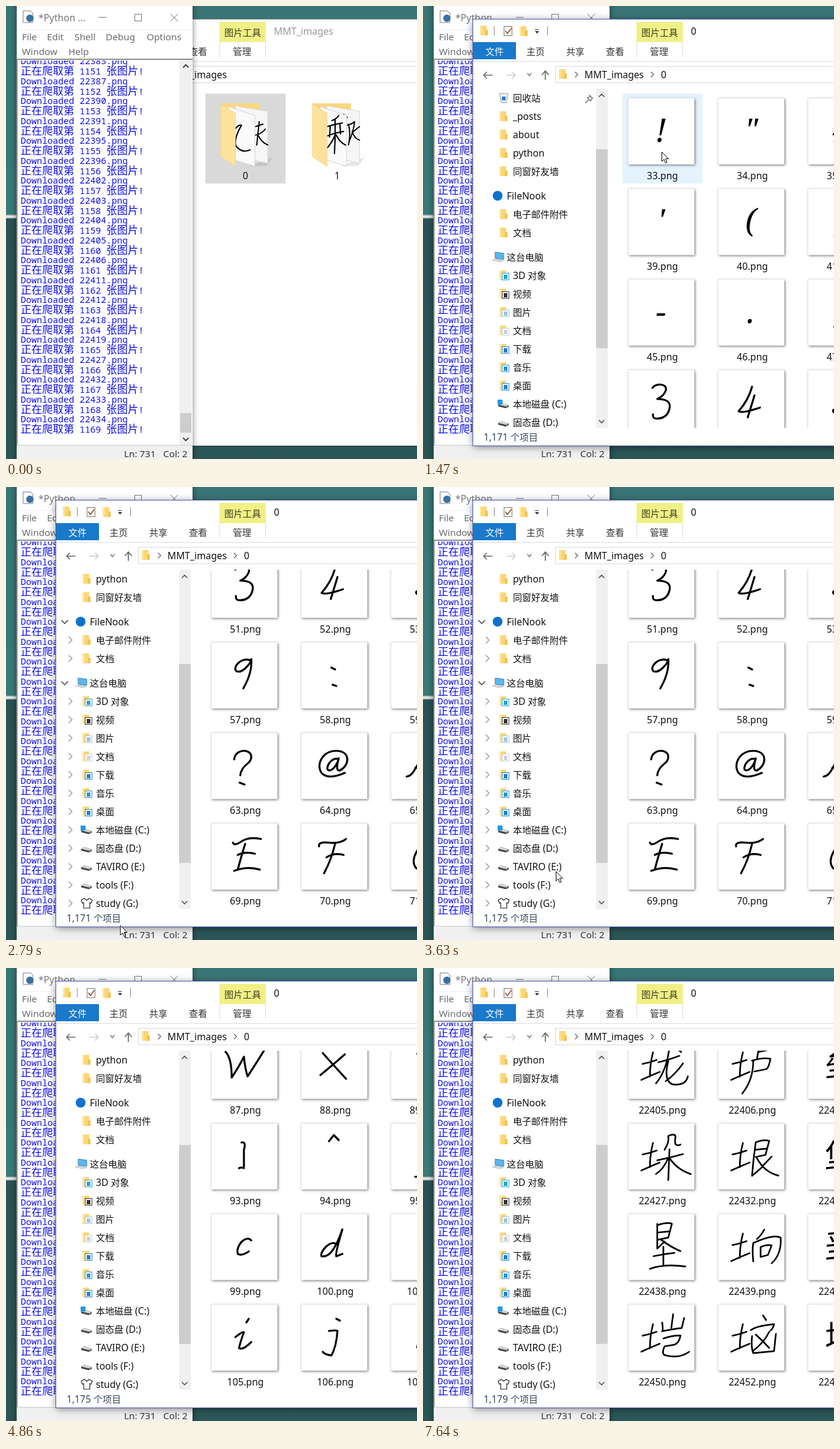
Recreate the animation shown at these times as an HTML page with a canvas. Size 672 by 740 pixels, loop 8000 ms.

```html
<!DOCTYPE html>
<html lang="zh">
<head>
<meta charset="utf-8">
<style>
html, body { margin: 0; width: 672px; height: 740px; overflow: hidden; background: #2a5456; }
canvas { display: block; }
</style>
</head>
<body>
<canvas id="stage" width="672" height="740"></canvas>
<script>
const g = document.getElementById('stage').getContext('2d');
const LOOP = 8000, ROW = 148;

// ---------- drawing helpers ----------
function rect(x, y, w, h, fill) { g.fillStyle = fill; g.fillRect(x, y, w, h); }
function frame(x, y, w, h, color) { g.strokeStyle = color; g.lineWidth = 1; g.strokeRect(x + .5, y + .5, w - 1, h - 1); }
function poly(points, fill, stroke, width = 1) {
  g.beginPath();
  for (let i = 0; i < points.length; i += 2) g.lineTo(points[i], points[i + 1]);
  g.closePath();
  if (fill) { g.fillStyle = fill; g.fill(); }
  if (stroke) { g.strokeStyle = stroke; g.lineWidth = width; g.stroke(); }
}
function disc(x, y, rx, ry, fill) {
  g.beginPath(); g.ellipse(x, y, rx, ry, 0, 0, 7); g.fillStyle = fill; g.fill();
}
function stroke(d, x, y, width, color = '#000') {
  g.save();
  g.translate(x, y);
  g.lineCap = g.lineJoin = 'round';
  g.lineWidth = width; g.strokeStyle = color;
  g.stroke(new Path2D(d));
  g.restore();
}
function clip(x, y, w, h, draw) {
  g.save(); g.beginPath(); g.rect(x, y, w, h); g.clip(); draw(); g.restore();
}
function shadowed(blur, color, dx, dy, draw) {
  g.save();
  g.shadowBlur = blur; g.shadowColor = color; g.shadowOffsetX = dx; g.shadowOffsetY = dy;
  draw();
  g.restore();
}

const CJK = '"Noto Sans CJK SC", "Noto Sans CJK", sans-serif';
const UI = { cjk: `15px ${CJK}`, latin: '15.6px "Noto Sans", sans-serif' };
const MENU = { cjk: UI.cjk, latin: '500 15.3px "Noto Sans", sans-serif' };
const LOG = { cjk: `500 17.5px ${CJK}`, latin: '14.58px "Noto Sans Mono", monospace' };

// Text vertically centred on y; Latin and Chinese runs have their own size.
function text(s, x, y, color = '#111', font = UI, centred = false) {
  const runs = s.match(/[\x00-\xff]+|[^\x00-\xff]+/g).map(run => {
    g.font = run.charCodeAt(0) < 256 ? font.latin : font.cjk;
    return { run, font: g.font, width: g.measureText(run).width };
  });
  if (centred) x -= runs.reduce((sum, r) => sum + r.width, 0) / 2;
  g.fillStyle = color;
  for (const r of runs) {
    g.font = r.font;
    g.fillText(r.run, x, y + 5.5);
    x += r.width;
  }
}

// ---------- timing ----------
const stepAt = (steps, t) => steps.reduce((value, [at, v]) => t >= at ? v : value, steps[0][1]);
const fade = (t, a, b) => Math.min(1, Math.max(0, (t - a) / (b - a)));

const OPEN = 1300, FRONT = 840;
const listScroll = [[0, 0], [1700, 489], [3880, 933], [4260, 1377], [5640, 14253], [5790, 19877],
  [5870, 23577], [5950, 26537], [6030, 28000], [6250, 28461], [6330, 28609]];
const treeScroll = [[0, 0], [1860, 30], [2100, 60], [2300, 90]];
const itemCount = [[0, 1171], [3400, 1175], [6330, 1179]];
const logCount = [[0, 1169], [70, 1170], [530, 1171]];
const pointerPath = [[70, 539, 262], [300, 470, 262], [530, 445, 250], [690, 390, 238], [1700, 390, 238],
  [1930, 284, 503], [2300, 284, 540], [2540, 250, 600], [2790, 187, 716], [3100, 64, 712], [3450, 64, 700],
  [3800, 360, 560], [4170, 569, 432], [4330, 569, 432], [4860, 676, 450]];

function pointerAt(t) {
  for (let i = 1; i < pointerPath.length; i++) {
    const [t0, x0, y0] = pointerPath[i - 1], [t1, x1, y1] = pointerPath[i];
    if (t >= t0 && t < t1) {
      const k = (t - t0) / (t1 - t0);
      return { x: x0 + (x1 - x0) * k, y: y0 + (y1 - y0) * k };
    }
  }
  return { x: 900, y: 900 };
}

// ---------- file names and handwriting ----------
const tail = [62, 63, 64, 65, 66, 67, 68, 69, 70, 71, 72, 73, 78, 79, 80, 83, 87, 90, 91, 95, 96, 102, 103, 104,
  105, 106, 111, 112, 118, 119, 127, 132, 133, 134, 135, 137, 138, 139, 140, 141, 146, 148, 150, 152, 153];
const fileName = n => (n <= 94 ? 32 + n : n < 1135 ? 21227 + n : 22300 + tail[n - 1135]) + '.png';

const EARTH = 'M24 50Q36 49 47 46M41 33Q36 52 36 72M22 76Q36 71 52 66';
const ink = {
  3: 'M40 30C45 22 65 22 62 34Q58 44 48 48Q72 48 68 64Q64 80 47 80Q40 80 41 73',
  4: 'M56 28Q50 50 34 68Q40 72 69 62M60 42Q54 62 49 78',
  9: 'M64 30C50 24 34 42 42 48C52 52 66 34 66 28Q68 50 53 76',
  ':': 'M50 42l6 3M52 70l6 2',
  '?': 'M38 44C40 26 66 26 66 40C66 52 50 52 48 70M47 82l8 3',
  '@': 'M62 44C50 38 38 60 46 62C56 62 62 44 62 42Q56 64 64 62C80 54 82 30 58 30C36 30 24 52 34 66Q44 78 72 66',
  A: 'M26 72Q34 72 42 56L60 26L66 76M40 58L70 54',
  E: 'M36 32Q38 38 50 30T82 26M56 34Q48 60 44 76M44 52Q56 46 72 50M38 78Q60 70 80 76',
  F: 'M30 38Q28 30 46 32T74 26M56 34Q50 60 38 82M42 56Q54 48 70 52',
  G: 'M70 32C50 26 28 60 42 74Q56 80 66 58M54 58h18',
  W: 'M24 32Q34 42 34 74Q46 56 54 40Q56 60 60 72Q72 54 88 28',
  X: 'M36 34Q50 50 74 76M72 36Q54 52 32 70',
  ']': 'M50 32Q58 30 54 44V74Q50 72 46 74',
  '^': 'M46 30L54 20L62 28',
  _: 'M40 88h30',
  c: 'M66 44C58 34 40 52 44 66Q50 70 62 62',
  d: 'M58 50C48 42 30 64 34 70C46 72 56 60 68 26Q56 66 58 70l10-4',
  i: 'M62 24l-4 6M40 54Q52 44 54 46Q48 62 46 72Q52 76 66 62',
  j: 'M58 24l6 3M46 44Q60 42 60 44Q58 70 50 84Q38 82 36 78',
  垅: EARTH + 'M50 50Q66 48 84 43M68 26Q64 64 46 84M66 50Q58 80 72 88Q94 94 98 78M90 56Q78 72 62 82M80 30l7 7',
  垆: EARTH + 'M68 24L64 46M67 35l14-2M56 48Q74 44 86 48Q84 60 80 64L60 66M58 48Q58 80 40 100',
  垛: EARTH + 'M60 46Q68 34 66 24Q76 20 78 26Q74 44 86 40M48 62Q68 60 90 56M68 46L66 96M66 60Q58 78 46 84M68 60Q80 80 103 90',
  垠: EARTH + 'M62 34Q76 30 84 34L78 56L62 58M62 46h17M62 34Q58 62 56 88L72 76M64 60Q76 84 99 92M88 60l-14 13',
  垦: 'M48 20Q64 16 72 20L66 42L48 44M50 32h19M48 18V58L60 48M54 44Q70 58 86 66M42 70Q58 68 76 68M58 56V86M36 90Q60 84 94 92',
  垧: EARTH + 'M76 30Q70 40 64 44M58 80Q56 60 58 50Q92 38 103 46Q104 74 88 86M70 58Q80 54 88 57L82 72L70 74z',
  垲: EARTH + 'M74 20L71 42M56 32Q58 44 56 46Q76 44 88 44L92 28M58 58Q74 54 86 56Q84 68 76 70L60 71Q54 84 62 86Q84 94 100 84',
  垴: EARTH + 'M74 22l5 8M54 44Q62 38 92 38Q90 46 86 48M62 52Q74 64 84 76M84 50Q76 66 58 78M56 54Q54 72 58 82Q74 82 92 82L95 54'
};
const lastRows = ['垅垆垒', '垛垠堡', '垦垧垩', '垲垴垵'];

function handwriting(ch, x, y) {
  g.save();
  g.translate(x, y);
  const hanzi = ch > '~';
  if (hanzi) g.transform(1, -.1, 0, 1, 0, 4); // Chinese strokes climb to the right
  if (ink[ch]) {
    stroke(ink[ch], 0, 0, hanzi ? 2.7 : 3.2);
  } else {
    g.font = `${hanzi ? '' : 'italic '}52px "Noto Serif", ${CJK}`;
    g.textAlign = 'center';
    g.fillStyle = '#000';
    g.fillText(ch, 54, 72);
  }
  g.restore();
}

// ---------- explorer contents ----------
function thumb(x, y, ch) {
  shadowed(4, 'rgba(0,0,0,.55)', 2, 2, () => rect(x + 9, y + 7, 108, 108, '#fff'));
  frame(x + 9, y + 7, 109, 109, '#e4e4e4');
  handwriting(ch, x + 9, y + 7);
}
function pictureIcon(x, y) {
  const l = x + 26, t = y + 11, blue = '#0078d7';
  poly([l, t, l + 55, t, l + 78, t + 23, l + 78, t + 105, l, t + 105], '#f7f8f9', '#c4c4c4');
  poly([l + 55, t, l + 55, t + 23, l + 78, t + 23], '#e6e6e6', '#c4c4c4');
  rect(l + 10, t + 26, 58, 58, blue);
  rect(l + 15, t + 31, 48, 48, '#fff');
  poly([l + 15, t + 74, l + 36, t + 43, l + 60, t + 79, l + 15, t + 79], blue);
  poly([l + 46, t + 58, l + 52, t + 51, l + 63, t + 67, l + 63, t + 79], blue);
}
function folder(x, y, front, back) {
  poly([x + 70, y + 119, x + 110, y + 104, x + 100, y + 118], 'rgba(0,0,0,.1)');
  poly([x + 25, y + 16, x + 88, y + 16, x + 88, y + 90, x + 40, y + 90], '#fbd67e');
  poly([x + 48, y + 20, x + 102, y + 29, x + 102, y + 114, x + 70, y + 107], '#f6f6f6', '#d6d6d6');
  stroke(back, x, y, 2);
  poly([x + 37, y + 21, x + 81, y + 36, x + 81, y + 119, x + 49, y + 109], '#fafafa', '#d2d2d2');
  stroke(front, x, y, 2.2);
  poly([x + 25, y + 17, x + 49, y + 32, x + 49, y + 119, x + 25, y + 103], '#fde29c', '#f5d78a');
}
function folders(t) {
  const hover = t >= 530;
  rect(326, 143, 131, 147, hover ? '#cce8ff' : '#d9d9d9');
  if (hover) frame(326, 143, 131, 147, '#99d1ff');
  const part = 'M82 54l12-4M88 46Q86 64 84 84M82 68Q92 66 98 58M86 68Q92 80 102 84';
  folder(326, 143, 'M47 60Q54 50 59 52Q46 74 50 86Q60 98 73 92', part);
  folder(476, 143,
    'M68 36Q64 42 57 44M49 54Q62 50 74 48M62 42Q63 70 61 98M47 70Q62 64 76 62M54 54l-1 17M70 50l1 16M62 68Q56 82 48 90M64 68Q70 80 79 84',
    'M76 34l6 5M80 52Q90 50 94 46Q92 62 86 76M84 50Q88 66 84 84M92 62l10-8M90 62Q94 74 102 76');
  text('0', 391.5, 277, '#111', UI, true);
  text('1', 541.5, 277, '#111', UI, true);
}
function files(t, pointer) {
  const scroll = stepAt(listScroll, t), first = Math.floor(scroll / ROW);
  for (let row = Math.max(0, first - 1); row < first + 5 && row < 197; row++) {
    for (let col = 0; col < 3; col++) {
      const n = row * 6 + col + 1, x = 326 + 147 * col, y = 143 + row * ROW - scroll;
      const dx = pointer.x - x, dy = pointer.y - y;
      const picked = row === 196 && col === 2 && t >= 7030 && t < 7640;
      if (picked || (dx >= 0 && dx < 131 && dy >= 0 && dy < 147)) rect(x, y, 131, 147, '#e5f3ff');
      const loaded = n <= 94 || (row >= 193 && t >= 6330 + (row - 193) * 40);
      if (loaded) thumb(x, y, n <= 94 ? String.fromCharCode(32 + n) : lastRows[row - 193][col]);
      else pictureIcon(x, y);
      text(fileName(n), x + 65.5, y + 134, '#111', UI, true);
    }
  }
}

// ---------- navigation tree: [label, y, icon, accent] ----------
const tree = [
  ['回收站', 150, 'bin'], ['_posts', 180], ['about', 210], ['python', 240], ['同窗好友墙', 270],
  ['FileNook', 310, 'dot'], ['电子邮件附件', 340], ['文档', 370],
  ['这台电脑', 410, 'pc'], ['3D 对象', 440, '', '#29a3d8'], ['视频', 470, '', '#333'], ['图片', 500, '', '#9fc4d8'],
  ['文档', 530, '', '#c9d3da'], ['下载', 560, '', '#1d7fd0'], ['音乐', 590, '', '#2b93df'], ['桌面', 620, '', '#1b85d8'],
  ['本地磁盘 (C:)', 650, 'disk', '#1f9be0'], ['固态盘 (D:)', 680, 'disk'], ['TAVIRO (E:)', 710, 'disk'],
  ['tools (F:)', 740, 'disk'], ['study (G:)', 770, 'shirt']
];
function smallFolder(x, y) {
  rect(x, y - 8, 11, 16, '#fbd672');
  rect(x + 9, y - 1, 4, 9, '#f3c14f');
  rect(x, y - 8, 3, 16, '#fde4a0');
}
function treeIcon(kind, accent, y) {
  if (kind === 'bin') {
    poly([125, y - 7, 139, y - 7, 136, y + 8, 128, y + 8], '#eef2f5', '#8d9aa5');
    rect(129, y - 2, 6, 6, '#2a78c8');
  } else if (kind === 'dot') {
    disc(122, y, 8, 8, '#0f72cf');
  } else if (kind === 'pc') {
    poly([118, y - 8, 132, y - 6, 132, y + 4, 118, y + 2], '#5bb7ef', '#3b80ad');
    poly([113, y + 5, 120, y + 3, 132, y + 6, 125, y + 8], '#d5d9dc', '#aaa', .6);
  } else if (kind === 'disk') {
    poly([123, y + 1, 128, y - 2, 140, y + 2, 140, y + 5, 135, y + 7, 123, y + 4], '#444');
    poly([123, y + 1, 128, y - 2, 140, y + 2, 135, y + 4], '#d4d4d4');
    rect(136, y + 3, 2, 2, '#5fd060');
    if (accent) rect(122, y - 7, 8, 8, accent);
  } else if (kind === 'shirt') {
    poly([123, y - 5, 128, y - 8, 132, y - 5, 136, y - 8, 141, y - 5, 139, y, 137, y - 1, 137, y + 8, 127, y + 8, 127, y - 1, 125, y],
      '#fff', '#222', 1.2);
  } else {
    smallFolder(125, y);
    if (accent) {
      rect(129, y - 4, 12, 12, '#fff');
      frame(129, y - 4, 12, 12, accent);
      rect(132, y - 1, 6, 7, accent);
    }
  }
}
function sidebar(t) {
  const scroll = stepAt(treeScroll, t);
  const arrows = fade(t, 1780, 1900) * (1 - fade(t, 4400, 4860));
  clip(83, 135, 200, 554, () => tree.forEach(([label, top, kind, accent], i) => {
    const y = top - scroll, root = kind === 'dot' || kind === 'pc';
    if (y < 120 || y > 700) return;
    treeIcon(kind, accent, y);
    text(label, root ? 137 : 147, y);
    if (!i) stroke('M4 -4l5 5M6 -3l-5 3l5 5l3-5M2 4l-4 4', 268, y, 1.8, '#888');
    if (i < 5) return;
    g.globalAlpha = arrows;
    if (root) stroke('M-5-2l5 5l5-5', 96, y, 1.6, '#444');
    else stroke('M-2-5l5 5l-5 5', 105, y, 1.6, '#a0a0a0');
    g.globalAlpha = 1;
  }));
  rect(283, 135, 19, 554, '#f0f0f0');
  rect(283, Math.round(234 + scroll * .61), 19, 325, t >= 1880 && t < 2500 ? '#a6a6a6' : '#cdcdcd');
  stroke('M-4 2l4-4l4 4', 292, 146, 1.7, '#555');
  stroke('M-4-2l4 4l4-4', 292, 679, 1.7, '#555');
}

function explorer(t, pointer) {
  const open = t >= OPEN;
  shadowed(t >= FRONT ? 12 : 0, 'rgba(0,0,0,.5)', 0, 2, () => rect(82, 22, 600, 696, '#fff'));
  frame(81, 21, 610, 698, open ? '#4a57b8' : '#6d7c86');

  smallFolder(93, 40);
  rect(116, 33, 1, 15, '#888');
  frame(132, 33, 14, 16, '#777');
  stroke('M135 41l3 4l6-8', 0, 0, 1.8, '#a0522d');
  smallFolder(158, 41);
  rect(183, 38, 6, 1, '#333');
  poly([183, 41, 190, 41, 186.5, 45], '#333');
  rect(203, 33, 1, 15, '#888');

  rect(349, 26, 76, 33, '#f0f087');
  text('图片工具', 387, 43, '#3d3d20', UI, true);
  text(open ? '0' : 'MMT_images', 438, 41, open ? '#111' : '#999');
  rect(82, 59, 70, 28, '#1979ca');
  text('文件', 117, 74, '#fff', UI, true);
  [['主页', 184], ['共享', 249], ['查看', 314], ['管理', 386]].forEach(([s, x]) => text(s, x, 74, '#333', UI, true));
  rect(349, 59, 1, 25, '#ddd');
  rect(424, 59, 1, 25, '#ddd');
  rect(82, 90, 590, 1, '#dcdcdc');

  stroke('M7 0H-7M-2-5l-5 5l5 5', 106, 113, 1.6, '#666');
  stroke('M-7 0H7M2-5l5 5l-5 5', 144, 113, 1.6, '#ccc');
  stroke('M-3-2l3 4l3-4', 174, 112, 1.4, '#777');
  stroke('M0 7V-6M-5-1l5-6l5 6', 200, 113, 1.7, '#666');
  frame(216, 98, 500, 28, '#d9d9d9');
  smallFolder(222, 111);
  stroke('M-2-4l4 4l-4 4', 251, 112, 1.4, '#666');
  text('MMT_images', 264, 112);
  if (open) {
    stroke('M-2-4l4 4l-4 4', 375, 112, 1.4, '#666');
    text('0', 389, 112);
  }

  sidebar(t);
  clip(305, 135, 367, 554, () => open ? files(t, pointer) : folders(t));
  if (open) {
    text('1,' + (stepAt(itemCount, t) - 1000) + ' 个项目', 99, 704, '#36475a');
  } else {
    text('2 个项目', 99, 704, '#36475a');
    text('选中 1 个项目', 182, 704, '#36475a');
  }
}

// ---------- shell window ----------
function shell(t) {
  shadowed(10, 'rgba(0,0,0,.5)', 0, 0, () => rect(17, -10, 288, 760, '#fff'));
  rect(17, 0, 1, 740, '#8a9a9c');
  poly([28, 8, 40, 8, 44, 12, 44, 27, 28, 27], '#fff', '#777');
  disc(39, 20, 6, 6, '#3b6fa5');
  text('*Python ...', 53, 19, '#777');
  stroke('M152 18.5h12', 0, 0, 1, '#777');
  frame(210, 13, 12, 12, '#777');
  stroke('M269 13l12 12M281 13l-12 12', 0, 0, 1, '#777');
  rect(18, 38, 287, 1, '#f0f0f0');
  [['File', 26, 50], ['Edit', 67, 50], ['Shell', 112, 50], ['Debug', 163, 50], ['Options', 230, 50],
    ['Window', 26, 74], ['Help', 102, 74]].forEach(([s, x, y]) => text(s, x, y, '#6a6a6a', MENU));
  rect(18, 86, 287, 2, '#8e8e8e');
  rect(17, 87, 2, 631, '#8e8e8e');

  const count = stepAt(logCount, t), blue = '#1111e6';
  clip(19, 89, 264, 628, () => {
    for (let i = 0; i < 19; i++) {
      const y = 90.5 + 32.5 * i;
      text('Downloaded ' + fileName(count - 19 + i), 24, y - 1, blue, LOG);
      text(`正在爬取第 ${count - 18 + i} 张图片!`, 24, y + 16, blue, LOG);
    }
  });

  rect(283, 88, 21, 630, '#f0f0f0');
  rect(285, 665, 18, 32, '#cdcdcd');
  stroke('M-4 2l4-4l4 4', 294, 98, 2, '#444');
  stroke('M-4-2l4 4l4-4', 294, 708, 2, '#444');
  rect(18, 718, 287, 22, '#f0f0f0');
  rect(18, 717, 287, 1, '#c8c8c8');
  text('Ln: 731', 193, 731, '#333', MENU);
  text('Col: 2', 257, 731, '#333', MENU);
}

function desktop() {
  const top = g.createLinearGradient(0, 0, 0, 342);
  top.addColorStop(0, '#397575');
  top.addColorStop(1, '#3a7a78');
  rect(0, 0, 672, 342, top);
  const low = g.createLinearGradient(0, 347, 0, 740);
  low.addColorStop(0, '#2a5254');
  low.addColorStop(1, '#2b5658');
  rect(0, 347, 672, 393, low);
  rect(0, 341, 17, 6, '#b9c4c4');
  rect(0, 343, 17, 2, '#eef0f0');
}

function draw(now) {
  const t = now % LOOP, pointer = pointerAt(t);
  desktop();
  if (t < FRONT) { explorer(t, pointer); shell(t); }
  else { shell(t); explorer(t, pointer); }
  g.save();
  g.translate(pointer.x, pointer.y);
  poly([.5, .5, .5, 16, 4, 12.5, 6.5, 18.5, 9, 17.5, 6.5, 11.5, 11.5, 11.5], '#fff', '#000');
  g.restore();
}
const start = performance.now();
function tick() {
  draw(performance.now() - start);
  requestAnimationFrame(tick);
}
tick();
</script>
</body>
</html>
```
